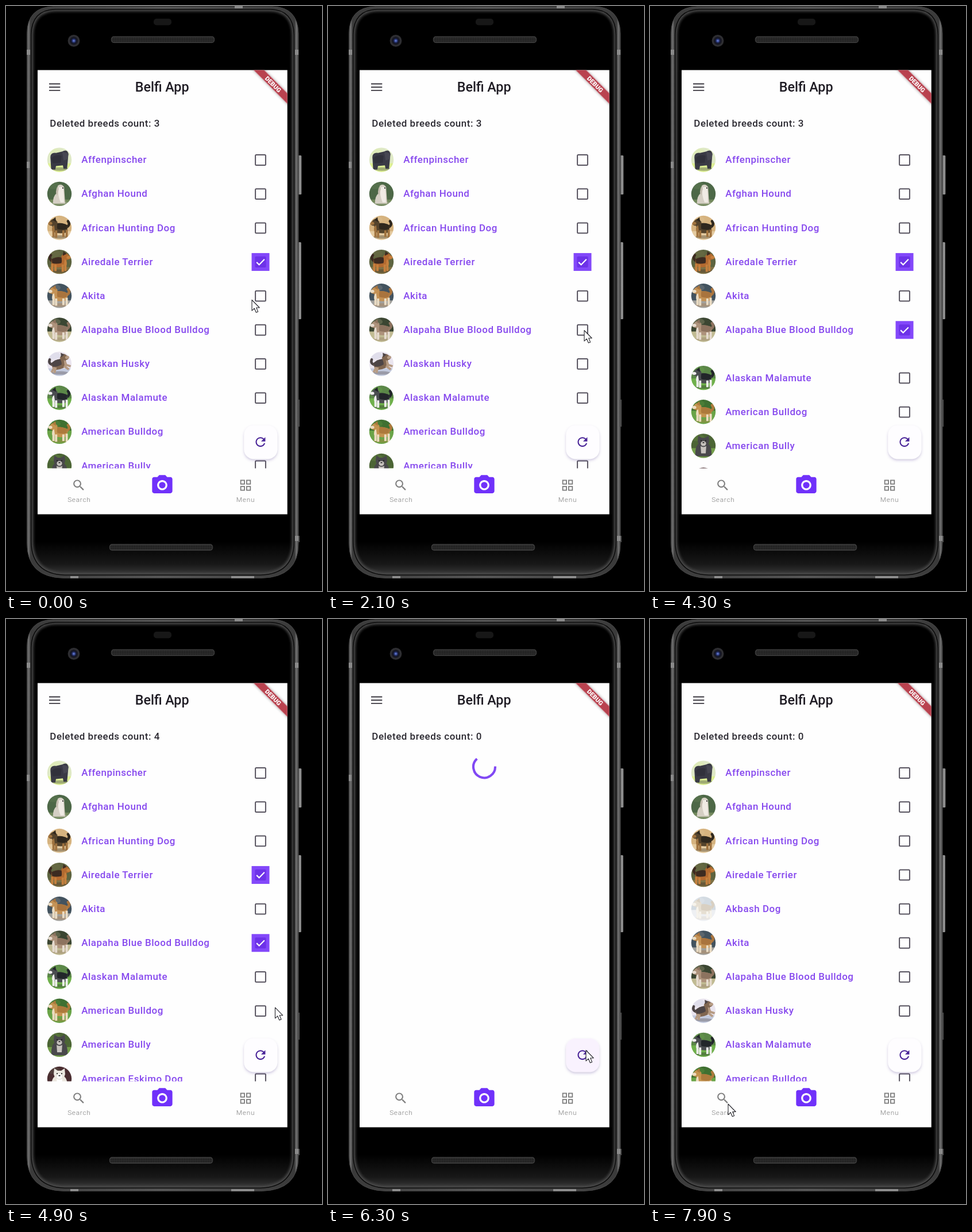
Recreate the animation shown at these times as an HTML page. Size 550 by 1018 pixels, loop 8000 ms.

```html
<!DOCTYPE html>
<html lang="en">
<head>
<meta charset="utf-8">
<title>Dog breeds list</title>
<style>
html, body { margin: 0; width: 100%; height: 100%; overflow: hidden; background: #000; }
svg { display: block; width: 100%; height: 100%; }
text { font-family: Roboto, sans-serif; font-weight: 500; }
.item { font-size: 16.93px; letter-spacing: .53px; fill: #8648ee; }
.nav { font-size: 11.8px; letter-spacing: .75px; font-weight: 300; fill: #7d7d7d; text-anchor: middle; }
</style>
</head>
<body>
<svg viewBox="0 0 550 1018">
  <defs>
    <path id="face" d="M43 50Q44 6 86 5H460Q501 6 502 50V932Q502 989 443 991H102Q44 989 43 932Z"/>
    <clipPath id="inside"><use href="#face"/></clipPath>
    <clipPath id="round"><circle r="21.2"/></clipPath>
    <clipPath id="screen"><rect x="55" y="111.5" width="434.7" height="773"/></clipPath>
    <clipPath id="view"><rect x="55" y="225" width="435" height="579.5"/></clipPath>
    <linearGradient id="rim">
      <stop offset="0" stop-color="#3c3c3c"/><stop offset=".006" stop-color="#747474"/>
      <stop offset=".013" stop-color="#3a3a3a"/><stop offset=".5" stop-color="#555"/>
      <stop offset=".986" stop-color="#3a3a3a"/><stop offset=".993" stop-color="#747474"/>
      <stop offset="1" stop-color="#3c3c3c"/>
    </linearGradient>
    <linearGradient id="chin" x2="0" y2="1">
      <stop offset="0" stop-color="#000"/><stop offset=".94" stop-color="#000"/>
      <stop offset=".98" stop-color="#181818"/><stop offset="1" stop-color="#3a3a3a"/>
    </linearGradient>
    <linearGradient id="key">
      <stop offset="0" stop-color="#444"/><stop offset=".6" stop-color="#a0a0a0"/><stop offset="1" stop-color="#666"/>
    </linearGradient>
    <radialGradient id="lens">
      <stop offset="0" stop-color="#7d93e8"/><stop offset=".2" stop-color="#34458f"/>
      <stop offset=".42" stop-color="#12152a"/><stop offset=".66" stop-color="#1c1c22"/><stop offset=".74" stop-color="#323236"/><stop offset="1" stop-color="#28282b"/>
    </radialGradient>
    <radialGradient id="ink">
      <stop offset="0" stop-color="#e9dcfb"/><stop offset=".6" stop-color="#efe4fc"/><stop offset="1" stop-color="#f9f2fe" stop-opacity="0"/>
    </radialGradient>
    <pattern id="mesh" width="3" height="3" patternUnits="userSpaceOnUse">
      <rect width="3" height="3" fill="#303030"/><circle cx="1.5" cy="1.5" r="1" fill="#121212"/>
    </pattern>
    <filter id="blur"><feGaussianBlur stdDeviation="2.2"/></filter>
    <filter id="photo"><feGaussianBlur stdDeviation=".55"/></filter>
    <filter id="shade" x="-40%" y="-40%" width="180%" height="180%">
      <feDropShadow dx="0" dy="2.5" stdDeviation="2" flood-color="#63519c" flood-opacity=".3"/>
    </filter>
    <filter id="soft" x="-20%" y="-80%" width="140%" height="260%">
      <feDropShadow dx="0" dy="0" stdDeviation="2.4" flood-opacity=".4"/>
    </filter>
  </defs>

  <rect width="550" height="1018"/>
  <g fill="url(#key)">
    <rect x="508" y="260" width="6.5" height="68" rx="1.5"/>
    <rect x="508" y="411" width="6" height="134" rx="1.5"/>
    <rect x="508" y="685" width="3" height="47" opacity=".6"/>
    <rect x="508" y="922" width="3" height="11" opacity=".6"/>
  </g>
  <path d="M36.5 48Q37 2 82 1H464Q508 2 509 48V935Q509 994 445 995.5H100Q37 994 36.5 935Z" fill="url(#rim)" stroke="#484848"/>
  <use href="#face" fill="url(#chin)"/>
  <g clip-path="url(#inside)" fill="none">
    <use href="#face" stroke="#4a4a4a" stroke-width="9" filter="url(#blur)"/>
    <use href="#face" stroke="#0a0a0a" stroke-width="3"/>
  </g>
  <g fill="#8a8a8a">
    <rect x="36" y="76" width="6" height="9"/><rect x="503" y="76" width="6" height="9"/>
    <rect x="36" y="271" width="5" height="11"/><rect x="503" y="922" width="6" height="9"/>
    <rect x="112" y="992" width="14" height="4"/><rect x="392" y="992" width="40" height="4"/>
    <rect x="398" y="0" width="14" height="4"/>
  </g>
  <rect x="257" y="22" width="31" height="11.5" rx="5" fill="#171717"/>
  <g fill="url(#mesh)" stroke="#404040" stroke-width="1.3">
    <rect x="183.5" y="53.5" width="179" height="10" rx="4"/>
    <rect x="180.5" y="937" width="179" height="10" rx="4"/>
  </g>
  <circle cx="118" cy="60.5" r="10.5" fill="url(#lens)"/>

  <g clip-path="url(#screen)">
    <rect x="55" y="111" width="435" height="774" fill="#fefefe"/>
    <path d="M75 135.5H94.3M75 141.2H94.3M75 146.9H94.3" stroke="#3b3840" stroke-width="1.9"/>
    <text x="271.7" y="148.6" font-size="23.3" fill="#1f1c24" text-anchor="middle">Belfi App</text>
    <text id="count" class="item" x="76.3" y="209.7" style="fill:#2a2830"></text>
    <g clip-path="url(#view)"><g id="list"></g></g>
    <path id="spin" fill="none" stroke="#8148f4" stroke-width="4.1"/>

    <g fill="#808080">
      <path transform="translate(114 821.2) scale(1.06)" d="M15.5 14h-.79l-.28-.27C15.41 12.59 16 11.11 16 9.5 16 5.91 13.09 3 9.5 3S3 5.91 3 9.5 5.91 16 9.5 16c1.61 0 3.09-.59 4.23-1.57l.27.28v.79l5 4.99L20.49 19l-4.99-5zm-6 0C7.01 14 5 11.99 5 9.5S7.01 5 9.5 5 14 7.01 14 9.5 11.99 14 9.5 14z"/>
      <path d="M408.6 825.4h6.4v6.4h-6.4zM418.9 825.4h6.4v6.4h-6.4zM408.6 836.2h6.4v6.4h-6.4zM418.9 836.2h6.4v6.4h-6.4z" fill="none" stroke="#7c7c7c" stroke-width="1.8"/>
      <text class="nav" x="127.3" y="863">Search</text>
      <text class="nav" x="417" y="863">Menu</text>
    </g>
    <g transform="translate(250.8 812.6) scale(1.765)" fill="#7031fa">
      <path d="M9 2L7.17 4H4c-1.1 0-2 .9-2 2v12c0 1.1.9 2 2 2h16c1.1 0 2-.9 2-2V6c0-1.1-.9-2-2-2h-3.17L15 2H9zm3 15c-2.76 0-5-2.24-5-5s2.24-5 5-5 5 2.24 5 5-2.24 5-5 5z"/>
      <circle cx="12" cy="12" r="3.2"/>
    </g>

    <rect id="fab" x="414.3" y="730" width="58" height="58.2" rx="16.5" filter="url(#shade)"/>
    <circle id="press" cx="447" cy="755" fill="url(#ink)"/>
    <path transform="translate(430.2 746) scale(1.06)" fill="#4a2598" d="M17.65 6.35C16.2 4.9 14.21 4 12 4c-4.42 0-7.99 3.58-7.99 8s3.57 8 7.99 8c3.73 0 6.84-2.55 7.73-6h-2.08c-.82 2.33-3.04 4-5.65 4-3.31 0-6-2.69-6-6s2.69-6 6-6c1.66 0 3.14.69 4.22 1.78L13 11h7V4l-2.35 2.35z"/>

    <g transform="translate(465 136.3) rotate(45)">
      <rect x="-60" y="-6.4" width="120" height="12.8" fill="#b9434f" filter="url(#soft)"/>
      <text y="3.8" font-size="10.8" style="font-weight:900" fill="#fff" text-anchor="middle">DEBUG</text>
    </g>
  </g>
  <path id="cursor" d="M0 0V18.6L4.3 14.7 7.3 21.8 10.6 20.4 7.7 13.5H13.2Z" fill="#fff" stroke="#25252b" stroke-width="1.1" stroke-linejoin="round"/>
</svg>
<script>
const PITCH = 59.15, TOP = 267.5, LOOP = 8000;
const $ = id => document.getElementById(id);
const clamp = v => Math.max(0, Math.min(1, v));
const mix = (a, b, k) => a + (b - a) * k;

function bezier(x1, y1, x2, y2) {
  const at = (a, b, s) => 3 * a * s * (1 - s) ** 2 + 3 * b * s * s * (1 - s) + s ** 3;
  return x => {
    let lo = 0, hi = 1;
    for (let i = 0; i < 24; i++) {
      const m = (lo + hi) / 2;
      if (at(x1, x2, m) < x) lo = m; else hi = m;
    }
    return at(y1, y2, lo);
  };
}
const ease = bezier(.25, .1, .25, 1), standard = bezier(.4, 0, .2, 1);

// name, backdrop, ground, horizon, coat, markings, back, pose
const breeds = [
  ['Affenpinscher', '#dfe9c6', '#dcee93', 6, '#3a3a45', '#474752', '#31313b', 'shaggy'],
  ['Afghan Hound', '#4d6847', '#71885c', 10, '#d5cfc4', '#f0ebe4', '#c4bdb0', 'sit'],
  ['African Hunting Dog', '#d6b37f', '#e5cba0', 6, '#54432c', '#a0733f', '#2f281e', 'left'],
  ['Airedale Terrier', '#5d6440', '#7f7246', 9, '#b36a30', '#c5803e', '#3d2b21', 'right'],
  ['Akbash Dog', '#d3dbe2', '#eef0f3', 2, '#e6dfd2', '#f6f3ec', '#d9d0c2', 'left'],
  ['Akita', '#43535f', '#a2a19d', 8, '#c49256', '#eadcc4', '#a9743e', 'left'],
  ['Alapaha Blue Blood Bulldog', '#3b4632', '#c1bb93', 3, '#ad927b', '#e6dbcf', '#8d735f', 'left'],
  ['Alaskan Husky', '#eae5ef', '#c3cade', 8, '#806650', '#b69b83', '#4d4546', 'run'],
  ['Alaskan Malamute', '#5b8748', '#6fb04b', 1, '#4a4d50', '#eeeeec', '#22262a', 'left'],
  ['American Bulldog', '#3f7031', '#6aa448', -2, '#c49450', '#ecdcc0', '#ad7a3c', 'left'],
  ['American Bully', '#4c6535', '#739d4a', 4, '#49484b', '#c7c3be', '#353539', 'front'],
  ['American Eskimo Dog', '#4a2d30', '#62705a', 8, '#ebe7df', '#fff', '#d6d0c6', 'front']
];

const turn = {
  left: 'scale(-1.15 1.15)', right: 'scale(1.15)', shaggy: 'scale(1.2)', run: 'rotate(-14) scale(1.12)', sit: '', front: ''
};

function dog(coat, mark, saddle, pose) {
  if (pose === 'front') return `<path d="M-14 18Q-15-2-6-5H6Q15-2 14 18Z" fill="${coat}"/>
    <path d="M-5-1H5L4 13H-4Z" fill="${mark}"/>
    <path d="M-10-8L-9-18-3-14H3L9-18 10-8Q8 1 0 2-8 1-10-8Z" fill="${coat}"/>
    <ellipse cy="-4" rx="4.6" ry="4.2" fill="${mark}"/>
    <path d="M-5-9H-3M3-9H5M-1.5-5.5H1.5" stroke="#222" stroke-width="1.7"/>`;
  if (pose === 'sit') return `<path d="M-11 17Q-12 5-5-1L-3-14Q3-19 8-12L10 17Z" fill="${coat}"/>
    <path d="M-2-10Q4-15 7-9L8 15H2Q-3 4-2-10Z" fill="${mark}"/>
    <path d="M-4-12Q-8-2-4 3L-1-9Z" fill="${saddle}"/><path d="M5-10H7" stroke="#333" stroke-width="2"/>`;
  if (pose === 'shaggy') return `<path d="M-13-2Q-14-11-5-10L4-12Q11-16 13-9L12 3 11 13H6L5 8-5 9-6 14H-12Z" fill="${coat}"/>
    <path d="M4-12L13-9 12-1 6 1Z" fill="${mark}"/><path d="M-12-2Q-6-9 3-6L2 4-10 5Z" fill="${saddle}"/>`;
  const legs = pose === 'run' ? 'M-9 3L-15 10M-7 4L-11 12M6 5L12 12M8 3L16 8' : 'M-11 3V15M-6 4V14M5 4V15M9 2V14';
  return `<path d="M-11-1Q-17-5-13-10" fill="none" stroke="${saddle}" stroke-width="4" stroke-linecap="round"/>
    <path d="M-12-4Q-3-8 5-7L11 1 10 6Q0 10-12 7Z" fill="${coat}"/>
    <path d="${legs}" fill="none" stroke="${mark}" stroke-width="3.4"/>
    <path d="M-12-4Q-3-9 5-6L3 2Q-5 4-11 2Z" fill="${saddle}"/>
    <path d="M3-9Q9-17 14-10L17-7Q16-3 11-3L10 4 4 3Z" fill="${coat}"/>
    <path d="M8-4Q12-2 11 5L7 4Z" fill="${mark}"/>
    <ellipse cx="14" cy="-6.8" rx="3.2" ry="2.3" fill="${mark}"/>
    <path d="M5-9L6-16 11-12Z" fill="${saddle}"/>`;
}

const avatar = ([, back, ground, horizon, coat, mark, saddle, pose]) => `
  <g transform="translate(93 .2)" clip-path="url(#round)"><g filter="url(#photo)">
    <rect x="-26" y="-26" width="52" height="52" fill="${back}"/>
    <ellipse cx="-10" cy="-14" rx="12" ry="6" fill="${ground}" opacity=".25"/>
    <rect x="-26" y="${horizon}" width="52" height="34" fill="${ground}"/>
    <ellipse cx="1" cy="16" rx="15" ry="3" fill="${saddle}" opacity=".35"/>
    <g transform="${turn[pose]}">${dog(coat, mark, saddle, pose)}</g>
  </g></g>`;

$('list').innerHTML = breeds.map(b => `<g>${avatar(b)}
  <text class="item" x="131.2" y="5.7">${b[0]}</text>
  <g transform="translate(443 .5)">
    <rect x="-8.9" y="-8.9" width="17.8" height="17.8" rx="1.5" fill="none" stroke="#57535f" stroke-width="2"/>
    <g><rect class="halo"/><rect x="-9.6" y="-9.6" width="19.2" height="19.2" rx="2" fill="#6d32e8"/>
    <path d="M-6.8.4L-2.4 4.8 6.8-4.6" fill="none" stroke="#fff" stroke-width="2.2"/></g>
  </g></g>`).join('');

const rows = [...$('list').children].map((el, i) => ({
  el, name: breeds[i][0], tick: el.lastElementChild.lastElementChild, halo: el.querySelector('.halo')
}));
const show = (el, on) => el.setAttribute('visibility', on ? 'inherit' : 'hidden');

// time, x, y
const track = [
  [0, 428, 511.5], [900, 450, 564.5], [1000, 450, 564.5], [1200, 446, 564.5], [3000, 446, 564.5],
  [3600, 445, 622], [3700, 445, 622], [3900, 442, 622], [4700, 474, 655],
  [5600, 449, 750.5], [7400, 449, 750.5], [7900, 136, 844], [8000, 136, 844]
];

function moveCursor(t) {
  const i = track.findIndex(p => p[0] > t), a = track[i - 1], b = track[i];
  const k = (t - a[0]) / (b[0] - a[0]);
  $('cursor').setAttribute('transform', `translate(${mix(a[1], b[1], k)} ${mix(a[2], b[2], k)})`);
  show($('cursor'), t < 4100 || t >= 4800);
}

function drawList(t) {
  const fresh = t >= 7100;
  show($('list'), t < 6000 || fresh);
  const height = 1 - ease(clamp(((t - 4119) / 300 - .4) / .6));
  let y = TOP;
  for (const r of rows) {
    const husky = r.name === 'Alaskan Husky';
    const gone = !fresh && (r.name === 'Akbash Dog' || husky && t >= 4100);
    show(r.el, !gone);
    const dx = husky && !fresh ? -3 * clamp((t - 3700) / 200) : 0;
    r.el.setAttribute('transform', `translate(${dx} ${y})`);
    if (!gone) y += PITCH;
    else if (husky) y += PITCH * height;

    const late = r.name.startsWith('Alapaha');
    const on = !fresh && (r.name.startsWith('Airedale') || late && t >= 2800);
    show(r.tick, on);
    const grow = late ? clamp((t - 2700) / 400) : 1, size = mix(20, 31, grow);
    const set = { x: -size / 2, y: -size / 2, width: size, height: size, fill: grow < 1 ? '#8a72da' : '#8348fa' };
    for (const k in set) r.halo.setAttribute(k, set[k]);
  }
}

function drawSpinner(t) {
  show($('spin'), t >= 6000 && t < 7100);
  const e = Math.max(0, Math.min(t, 6900) - 5918), p = e / 1333 % 1;
  const head = standard(clamp(p * 2)), tail = standard(clamp(p * 2 - 1));
  const start = Math.PI * (-.5 + 1.5 * tail + 2 * e / 2222 + .5 * p);
  const sweep = Math.max(.01, 1.5 * Math.PI * (head - tail));
  const pt = a => `${272 + 19 * Math.cos(a)} ${257.3 + 19 * Math.sin(a)}`;
  $('spin').setAttribute('d', `M${pt(start)}A19 19 0 ${+(sweep > Math.PI)} 1 ${pt(start + sweep)}`);
}

function render(t) {
  moveCursor(t);
  drawList(t);
  drawSpinner(t);
  $('count').textContent = 'Deleted breeds count: ' + (t < 4800 ? 3 : t < 6000 ? 4 : 0);
  $('fab').setAttribute('fill', t >= 5500 && t < 7500 ? '#f9f2fe' : '#fefdff');
  show($('press'), t >= 5800 && t < 6100);
  $('press').setAttribute('r', mix(10, 24, clamp((t - 5800) / 150)));
}

let origin;
function tick(now) {
  origin ??= now;
  const t = (now - origin) % LOOP;
  render(Math.floor(t / 100 + .001) * 100 % LOOP);
  requestAnimationFrame(tick);
}
render(0);
requestAnimationFrame(tick);
</script>
</body>
</html>
```
